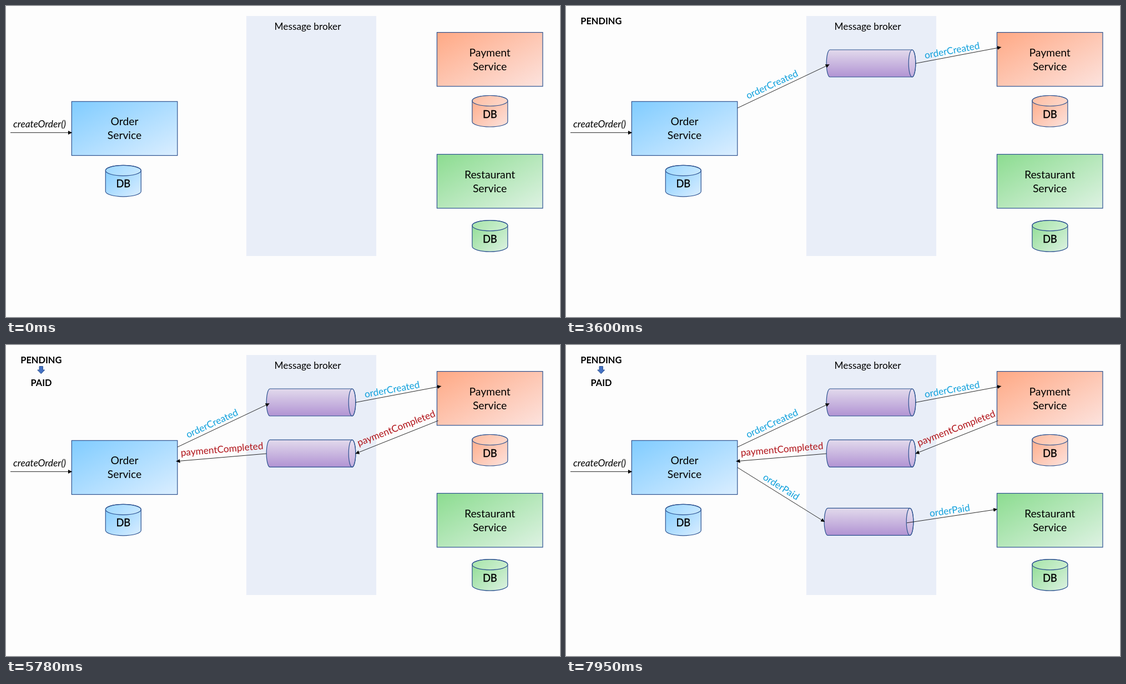
An HTML page for the animation above (7990 ms loop, 998 px wide and 561 px high).

```html
<!DOCTYPE html>
<html lang="en">
<head>
<meta charset="utf-8">
<title>Order saga</title>
<style>
  html, body { margin: 0; width: 100%; height: 100%; overflow: hidden; background: #fdfdfd; }
  svg { display: block; width: 998px; height: 561px; }
  text { font-family: Lato, "Open Sans", sans-serif; font-size: 17.3px; text-anchor: middle; }
  .service { font-size: 19.3px; }
  .db { font-size: 18.3px; stroke: #000; stroke-width: .35px; }
  .status { font-size: 16.4px; font-weight: bold; }
  .call { font-style: italic; }
  .outline { stroke: #2c5290; stroke-width: 1.2; }
  .cap { fill: #fff; fill-opacity: .22; }
  .wire { stroke: #111; stroke-width: .9; }
</style>
</head>
<body>
<svg id="stage" viewBox="0 0 998 561">
  <defs id="defs">
    <marker id="head" viewBox="0 0 7 7" refX="7" refY="3.5" markerWidth="7" markerHeight="7"
            markerUnits="userSpaceOnUse" orient="auto"><path d="M0 0L7 3.5L0 7Z"/></marker>
  </defs>
</svg>
<script>
const LOOP = 7990;
const BLUE = "#0fa0dc", RED = "#b01218";
const stage = document.getElementById("stage");
const defs = document.getElementById("defs");

function add(parent, tag, attrs, content = "") {
  const node = document.createElementNS("http://www.w3.org/2000/svg", tag);
  for (const key in attrs) node.setAttribute(key, attrs[key]);
  node.textContent = content;
  return parent.appendChild(node);
}

function gradient(id, from, to, x2) {
  const node = add(defs, "linearGradient", { id, x1: 0, y1: 0, x2, y2: 1 });
  add(node, "stop", { offset: 0, "stop-color": from });
  add(node, "stop", { offset: 1, "stop-color": to });
}

function text(parent, content, x, y, cls, fill = "#000", angle = 0) {
  add(parent, "text", { class: cls, fill, transform: `translate(${x} ${y}) rotate(${angle})` }, content);
}

function service(name, fill, x, y) {
  add(stage, "rect", { x, y, width: 190.5, height: 97.3, fill: `url(#${fill})`, class: "outline" });
  text(stage, name, x + 95.2, y + 43, "service");
  text(stage, "Service", x + 95.2, y + 68, "service");
}

function database(fill, x, y) {
  add(stage, "path", {
    d: `M${x} ${y + 9.5}a32 9.5 0 0 1 64 0v37.5a32 9.5 0 0 1 -64 0Z`,
    fill: `url(#${fill})`, class: "outline"
  });
  add(stage, "ellipse", { cx: x + 32, cy: y + 9.5, rx: 32, ry: 9.5, class: "cap outline" });
  text(stage, "DB", x + 32, y + 40, "db");
}

function queue(parent, x, y) {
  add(parent, "path", {
    d: `M${x + 6.3} ${y}h148a6.3 24.5 0 0 1 0 49h-148a6.3 24.5 0 0 1 0 -49Z`,
    fill: "url(#purple)", class: "outline"
  });
  add(parent, "ellipse", { cx: x + 154.3, cy: y + 24.5, rx: 6.3, ry: 24.5, class: "cap outline" });
}

function arrow(parent, x1, y1, x2, y2) {
  add(parent, "line", { x1, y1, x2, y2, class: "wire", "marker-end": "url(#head)" });
}

gradient("blue", "#80ccff", "#dbeeff", 1);
gradient("orange", "#ffa985", "#fce3de", 1);
gradient("green", "#8cdc90", "#def2e3", 1);
gradient("purple", "#e2daec", "#b193d3", 0);

add(stage, "rect", { x: 433, y: 18, width: 234, height: 433, fill: "#e9eef8" });
text(stage, "Message broker", 543.5, 43);
service("Order", "blue", 118.3, 172.3);
database("blue", 179.3, 287.3);
service("Payment", "orange", 776.4, 47.6);
database("orange", 839.8, 161.5);
service("Restaurant", "green", 776.4, 267.5);
database("green", 839.8, 386.6);
text(stage, "createOrder()", 60.5, 219, "call");
arrow(stage, 8, 228.4, 119, 228.4);

const [created, paid, forwarded] = [2000, 4000, 6000].map(start => {
  const node = add(stage, "g", {});
  return { node, start };
});

text(created.node, "PENDING", 63.3, 33.3, "status");
queue(created.node, 469.2, 79);
arrow(created.node, 309, 184, 474.5, 105.5);
arrow(created.node, 630, 103.5, 784, 74.3);
text(created.node, "orderCreated", 373.5, 147, "", BLUE, -24.6);
text(created.node, "orderCreated", 696.5, 86, "", BLUE, -10.4);

add(paid.node, "path", {
  d: "M60 38.5h6.4v6.5h3.3L63.2 51.8L56.7 45H60Z", fill: "#4472c4", stroke: "#2f528f"
});
text(paid.node, "PAID", 63.5, 74.3, "status");
queue(paid.node, 469.2, 171.2);
arrow(paid.node, 778.5, 136.5, 629.5, 196);
arrow(paid.node, 469, 196, 306.5, 209.8);
text(paid.node, "paymentCompleted", 705, 155.5, "", RED, -21.2);
text(paid.node, "paymentCompleted", 389.5, 194, "", RED, -4.9);

queue(forwarded.node, 465.2, 294.3);
arrow(forwarded.node, 309, 221, 466, 319);
arrow(forwarded.node, 614, 320.8, 777, 296.3);
text(forwarded.node, "orderPaid", 384.5, 261, "", BLUE, 32);
text(forwarded.node, "orderPaid", 692, 304.5, "", BLUE, -8.4);

const origin = performance.now();
function draw() {
  const time = (performance.now() - origin) % LOOP;
  for (const { node, start } of [created, paid, forwarded])
    node.setAttribute("visibility", time >= start ? "visible" : "hidden");
  requestAnimationFrame(draw);
}
draw();
</script>
</body>
</html>
```
